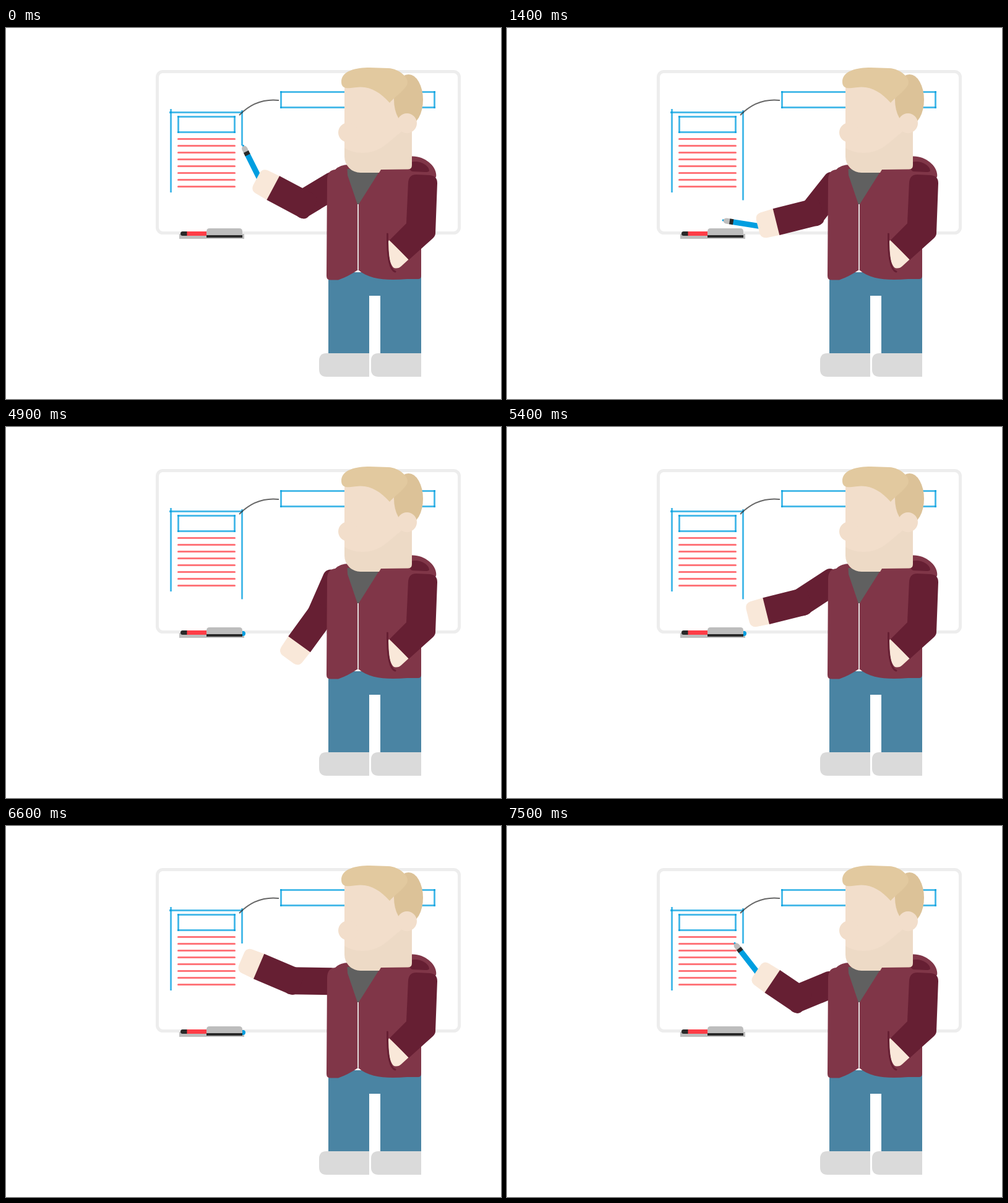
Animation of 800 by 600 pixels, one loop 7600 ms. Source, as an HTML page:

```html
<!DOCTYPE html>
<html lang="en">
<head>
<meta charset="utf-8">
<title>Whiteboard</title>
<style>
html, body { margin: 0; width: 100%; height: 100%; overflow: hidden; background: #fff; }
svg { display: block; width: 100%; height: 100%; }
.blue { stroke: #009ee0; }
.red { stroke: #ff3b42; stroke-linecap: round; }
.ink { stroke-width: 3; stroke-opacity: .7; fill: none; }
.sleeve { fill: #661f33; }
.coat { fill: #803648; }
.skin { fill: #f2decb; }
.hand { fill: #f9e8d9; }
.grey { fill: #bdbdbd; }
.black { fill: #292929; }
.pen { fill: #009ee0; }
</style>
</head>
<body>
<svg viewBox="0 0 800 600">
  <rect x="244.5" y="70.5" width="488" height="261" rx="9" fill="#fff" stroke="#ededed" stroke-width="5"/>

  <g id="board">
    <path class="ink blue" d="M266.500 131V266"/>
    <path class="ink blue" d="M264 136.500H383"/>
    <path class="ink blue" id="line"/>
  </g>
  <path d="M377 141Q404 113 441 117" fill="none" stroke="#333" stroke-opacity=".75" stroke-width="2"/>

  <rect class="grey" x="280" y="333" width="105" height="8"/>
  <circle id="parked" class="pen" cx="383" cy="334" r="4"/>
  <path class="black" d="M293 329H285.500A3.500 3.500 0 0 0 285.500 336H293Z"/>
  <rect x="292.500" y="329" width="32" height="7" fill="#ff3d47"/>
  <path class="grey" d="M324 335V329Q324 324 329 324H377Q382 324 382 329V335Z"/>
  <rect class="black" x="324" y="335" width="58" height="4"/>

  <g id="arm">
    <rect class="sleeve" x="-16" y="-22" width="89" height="44" rx="12"/>
    <g id="fore">
      <g id="wrist">
        <g id="pen">
          <path class="pen" d="M0-4.500H59V4.500H0ZM70-2L76-1.500V1L70 2Z"/>
          <path class="grey" d="M63-4.500H69Q74-4 74 0T69 4.500H63Z"/>
          <rect class="black" x="58" y="-4.500" width="6" height="9"/>
        </g>
        <path class="hand" d="M-2-22L21-21Q30-20 30.500-11V11Q30 20 21 21L-2 22Z"/>
      </g>
      <path id="cuff" class="sleeve"/>
    </g>
  </g>

  <path d="M521 395H671V526H605V433H587V526H521Z" fill="#4a84a3"/>
  <g fill="#dadada">
    <path id="shoe" d="M587 526H518Q506 526 506 538V552Q506 564 518 564H587Z"/>
    <use href="#shoe" x="84"/>
  </g>

  <path class="coat" d="M655 207.500C676 206 698 224 695 241L671 260V401Q671 406 666 406L648 406C618 408 588 408 569 391Q553 402 537 407.500H524Q518 407.500 518 401L519 246Q519 230 532 229Q540 221 554 221H640Z"/>
  <path class="sleeve" d="M654 217C668 213 684 222 684 231Q683 233 678 233L657 232Q652 231 653 226Z"/>
  <path d="M551.500 228H606L570 285H568L552 238Z" fill="#606060"/>
  <path d="M569 285V391" stroke="#e3dcdc" stroke-width="2"/>
  <path d="M547 150V208A26 26 0 0 0 573 234H603L606 229L650 228.500Q656 228 656 222V150Z" fill="#eddac6"/>
  <path class="skin" d="M547 90H640V167C616 186 604 202 575 202Q558 201 547 194Z"/>
  <circle class="skin" cx="553" cy="169" r="16"/>
  <ellipse cx="650.500" cy="116" rx="23.500" ry="41" fill="#dcc298"/>
  <circle class="skin" cx="648" cy="154" r="16"/>
  <path d="M542 88C541 69 566 64 588 64L618 65C636 66 650 80 649 88C648 98 632 108 620 121C606 105 590 95 572 95.500C562 96 556 98 549 97Q542 95 542 88Z" fill="#e2c99f"/>

  <path class="hand" d="M619 343L651 374L639 385Q634 390 627 388C619 382 617 360 618 345Z"/>
  <path class="sleeve" d="M650 250Q651 237 663 237L685 238Q697 239 697 251L694 332Q694 336 690 340L651 375L620 343L647 316Z"/>
  <path d="M616.500 333C616 365 619 391 629 394" fill="none" stroke="#661f33" stroke-width="3" stroke-linecap="round"/>
</svg>
<script>
const LOOP = 7600, STEP = 100;
const $ = id => document.getElementById(id);

// Pose: shoulder x, y, upper arm angle, forearm angle, forearm length, pen angle
const start = [526.8, 255.9, 31, -28, 59.5, 35.5];
const drawn = [538.6, 253.3, 67, 6.3, 60.3, 35.5];
const tray = [522, 255, 40, 20, 66, 14];
const rest = [533.4, 250, 73, 62, 59, 14];
const wiped = [520, 250, -14, -34, 61, 14];
const poses = [
  [0, ...start], [600, ...drawn], [1000, ...drawn], [1700, ...tray],
  [1900, ...rest], [4800, ...rest],
  [5600, 521, 252, 20, -2, 60, 14],
  [5900, 520.9, 251.9, 3, -27.5, 63, 14],
  [6100, ...wiped], [6500, ...wiped],
  [6900, 525.4, 254.6, 38.5, 9.5, 61, 14],
  [7000, ...tray],
  [7300, 521, 256.6, 29.5, -12.4, 58.8, 2],
  [7500, 520.5, 257.7, 22.5, -34, 54, 18],
  [LOOP, ...start]
];
const lineEnds = [[0, 190], [600, 278.5], [5600, 278.5], [6100, 190], [LOOP, 190]];

function sample(keys, t) {
  const i = keys.findIndex(k => k[0] > t);
  const a = keys[i - 1], b = keys[i];
  const p = (t - a[0]) / (b[0] - a[0]);
  return a.slice(1).map((v, n) => v + (b[n + 1] - v) * p);
}

function addInk(colour, d) {
  const path = document.createElementNS("http://www.w3.org/2000/svg", "path");
  path.setAttribute("class", "ink " + colour);
  path.setAttribute("d", d);
  $("board").append(path);
}

// Four separate strokes, so the corners overlap
function addBox(l, t, r, b) {
  for (const y of [t, b]) addInk("blue", `M${l} ${y + (y === t ? 1.5 : -1.5)}H${r}`);
  for (const x of [l, r]) addInk("blue", `M${x + (x === l ? 1.5 : -1.5)} ${t}V${b}`);
}

addBox(277, 142, 371, 170);
addBox(443, 102, 694, 130);
for (let i = 0; i < 8; i++) addInk("red", `M278.5 ${179.5 + 11 * i}H369.5`);

const move = (id, value) => $(id).setAttribute("transform", value);

function render(t) {
  const [x, y, upper, fore, len, pen] = sample(poses, t);
  const held = t < 1700 || t >= 7000;
  move("arm", `translate(${x} ${y}) scale(-1 1) rotate(${upper})`);
  move("fore", `translate(60 9) rotate(${fore - upper})`);
  move("wrist", `translate(${len} -9)`);
  move("pen", `translate(14 6) rotate(${-pen})`);
  $("cuff").setAttribute("d", `M${len} -31H-1Q-13 -31 -13 -19V1Q-13 13 -1 13H${len}Z`);
  $("pen").style.display = held ? "" : "none";
  $("parked").style.display = held ? "none" : "";
  $("line").setAttribute("d", `M381.5 133V${sample(lineEnds, t)[0]}`);
}

const begin = performance.now();
function tick() {
  const t = (performance.now() - begin) % LOOP;
  render(Math.floor(t / STEP) * STEP);
  requestAnimationFrame(tick);
}
tick();
</script>
</body>
</html>
```
